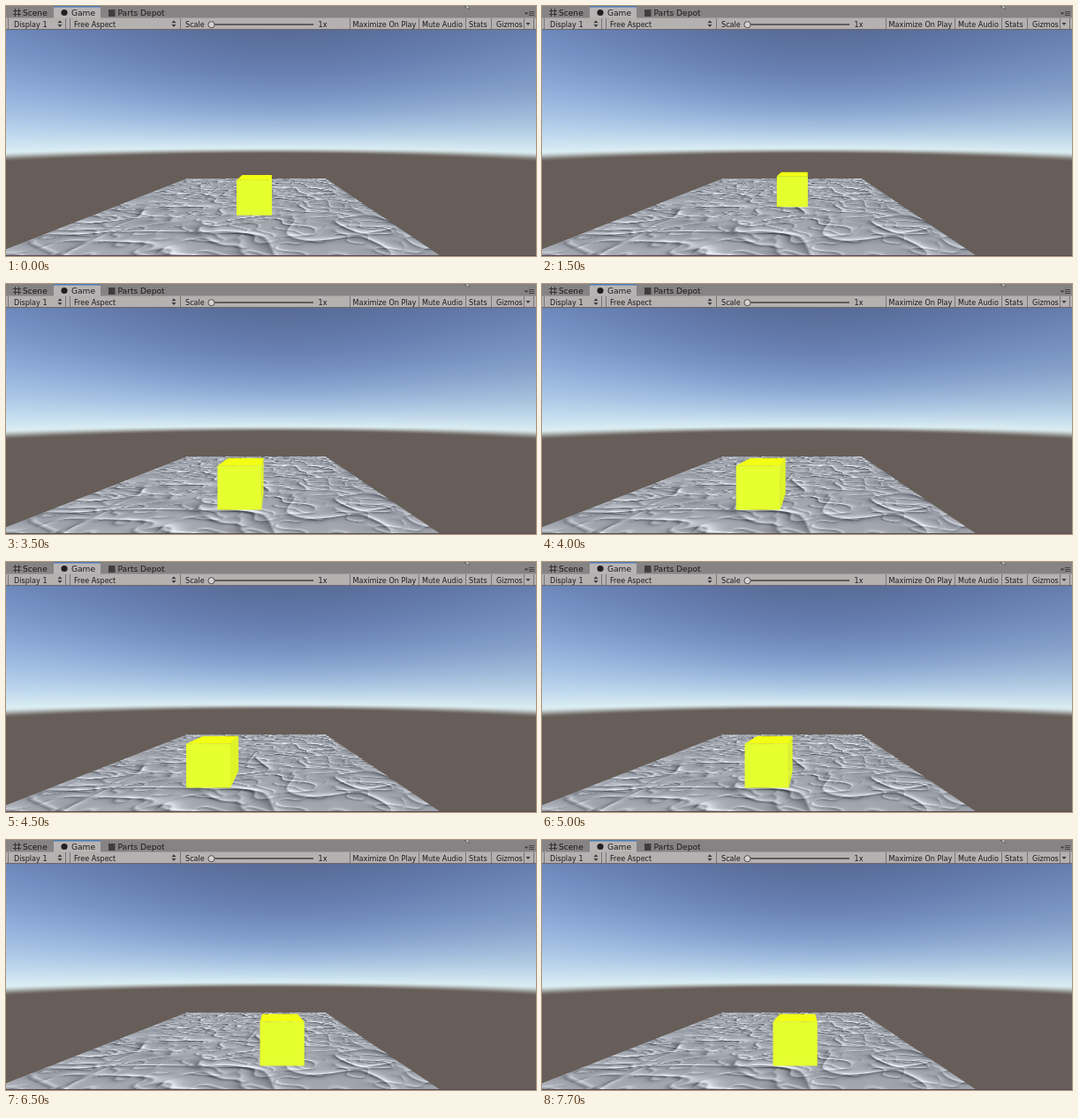
These frames come from a looping animation (600x284 px, 8000 ms). An HTML page with a canvas:

```html
<!DOCTYPE html>
<html lang="en">
<head>
<meta charset="utf-8">
<title>Game view</title>
<style>
  html, body { margin: 0; width: 100%; height: 100%; overflow: hidden; background: #665d58; }
  canvas, svg { position: absolute; left: 0; top: 0; display: block; }
  text { font: 8.1px "DejaVu Sans", Verdana, sans-serif; fill: #1a181a; }
  .tab { font-size: 9.1px; }
</style>
</head>
<body>
<canvas id="scene" width="600" height="284"></canvas>
<svg width="600" height="284" viewBox="0 0 600 284">
  <polygon id="side" fill="#dff428"/>
  <polygon id="lid" fill="#f3ff12"/>
  <polygon id="front" fill="#e6ff2e"/>

  <!-- tabs -->
  <rect width="600" height="14" fill="#868384"/>
  <rect x="54" width="53" height="14" fill="#b9b4b4"/>
  <rect x="54" width="53" height="1.5" fill="#4d7db5"/>
  <path d="M10.5 3V12M14.5 3V12M8 5.5H17M8 9.5H17" stroke="#343235"/>
  <circle cx="66" cy="7.5" r="3.6" fill="#222023"/>
  <rect x="116" y="4" width="7.5" height="8" fill="#403d41"/>
  <text class="tab" x="19" y="10.8">Scene</text>
  <text class="tab" x="74" y="10.8">Game</text>
  <text class="tab" x="126.5" y="10.8">Parts Depot</text>
  <path d="M518 0H523L525 3L522.5 2.5L521 1Z" fill="#f5f5f5" stroke="#333" stroke-width=".6"/>
  <path d="M587 7.5H591L589 10Z" fill="#333"/>
  <path d="M592 6.5H598M592 8.5H598M592 10.5H598" stroke="#444"/>

  <!-- toolbar -->
  <rect y="13.5" width="600" height="13" fill="#b6b1b1"/>
  <rect y="26" width="600" height="1.2" fill="#6c6b70"/>
  <path id="rules" stroke="#787475"/>
  <g fill="#3c3a3c">
    <path id="pick" d="M58.5 19.2H63.5L61 16.2ZM58.5 21H63.5L61 24Z"/>
    <use href="#pick" x="129"/>
    <path d="M588.5 19H593.5L591 22Z"/>
  </g>
  <path d="M236 21H348" stroke="#5f5c5d" stroke-width="2"/>
  <circle cx="232.5" cy="21.2" r="3.6" fill="#d6d2d2" stroke="#504d4e"/>
  <text x="9" y="23.5">Display 1</text>
  <text x="77" y="23.5">Free Aspect</text>
  <text x="203" y="23.5">Scale</text>
  <text x="353.5" y="23.5">1x</text>
  <text x="392.5" y="23.5">Maximize On Play</text>
  <text x="471" y="23.5">Mute Audio</text>
  <text x="524" y="23.5">Stats</text>
  <text x="555" y="23.5">Gizmos</text>
</svg>
<script>
const FOCAL = 222, VX = 300, VY = 162.5, LOOP = 8000;
const byId = id => document.getElementById(id);
const clamp = (v, lo, hi) => Math.min(hi, Math.max(lo, v));
const mix = (a, b, k) => a + (b - a) * k;
const ramp = (v, from, to) => clamp((v - from) / (to - from), 0, 1);
const smooth = k => k * k * (3 - 2 * k);

byId("rules").setAttribute("d",
  [2, 67, 72, 197, 389, 467, 520, 549, 586, 597].map(x => `M${x}.5 14V26`).join(""));

// Haze thins out with elevation, red first; the horizon bows down at the edges
function backdrop(x, y) {
  const dx = x - VX, side = dx / 300;
  const dy = 164.5 + 7 * side * side - y;
  const e = dy / Math.hypot(dx, dy, FOCAL), up = Math.max(0, e);
  const light = 1 - .04 * side * ramp(up, 0, .2);
  const sky = [72 + 156 * Math.exp(-4.2 * up), 70 + 175 * Math.exp(-2.9 * up), 246 - 180 * up];
  const ground = [103, 94, 89];
  const k = smooth(ramp(e, -.014, .018));
  return ground.map((g, i) => mix(g, sky[i] * light, k));
}

function hash(x, y) {
  const s = Math.sin(x * 127.1 + y * 311.7) * 43758.5453;
  return s - Math.floor(s);
}

function noise(x, y) {
  const i = Math.floor(x), j = Math.floor(y);
  const fx = smooth(x - i), fy = smooth(y - j);
  return mix(mix(hash(i, j), hash(i + 1, j), fx),
             mix(hash(i, j + 1), hash(i + 1, j + 1), fx), fy);
}

// Floor relief: narrow creases along the zero lines of layered noise
function relief(u, v) {
  let sum = 0, amp = .5, x = u * 1.6 + v * .9 + 9, y = v * 2.4 - u * .7 + 4;
  for (let o = 0; o < 3; o++) {
    sum -= amp * Math.exp(-6 * Math.abs(2 * noise(x, y) - 1));
    [x, y] = [x * 1.6 - y * .8 + 5, x * .8 + y * 1.6 + 3];
    amp *= .6;
  }
  return sum;
}

function floorShade(x, y) {
  const d = y - 155, u = (x - VX) / d, v = FOCAL / d;
  const slope = relief(u + .025, v + .025) - relief(u, v);
  return clamp(164 + slope * 270, 78, 235);
}

function paintScene() {
  const g = byId("scene").getContext("2d");
  const img = g.createImageData(600, 284);
  for (let y = 26; y < 284; y++) {
    const down = y - 196;
    const left = 202 - 2.55 * down, right = 363 + 1.48 * down;
    for (let x = 0; x < 600; x++) {
      let c = backdrop(x, y);
      const cover = down < 0 ? 0 : ramp(Math.min(x - left, right - x), 0, 2);
      if (cover) {
        const s = floorShade(x, y);
        c = [s - 4, s, s + 8].map((n, i) => mix(c[i], n, cover));
      }
      img.data.set([...c, 255], (y * 600 + x) * 4);
    }
  }
  g.putImageData(img, 0, 0);
  g.fillStyle = "#5b4b53";
  g.fillRect(0, 283, 600, 1);
}

const setPoints = (id, ...pts) => byId(id).setAttribute("points", pts.join(" "));

// Corners of an upright square: top left, top right, bottom right, bottom left
function square(x, z) {
  const s = FOCAL / z;
  const l = VX + (x - .5) * s, r = l + s, t = VY + .88 * s, b = t + s;
  return [[l, t], [r, t], [r, b], [l, b]];
}

function draw(now) {
  const t = Math.floor(Math.max(0, now - start) % LOOP / 100) * 100;
  // Away and back, then left, right and left again
  const z = 5.55 + .79 * ramp(t, 0, 1500) - 1.9 * ramp(t, 1700, 3200);
  const x = -.475 - .945 * ramp(t, 3200, 4400) + 1.75 * ramp(t, 4600, 5970)
            - .6 * ramp(t, 6380, 7280);
  const near = square(x, z), far = square(x, z + 1.1);
  setPoints("side", near[1], far[1], far[2], near[2]);
  setPoints("lid", near[0], far[0], far[1], near[1]);
  setPoints("front", ...near);
  requestAnimationFrame(draw);
}

paintScene();
const start = performance.now();
draw(start);
</script>
</body>
</html>
```
